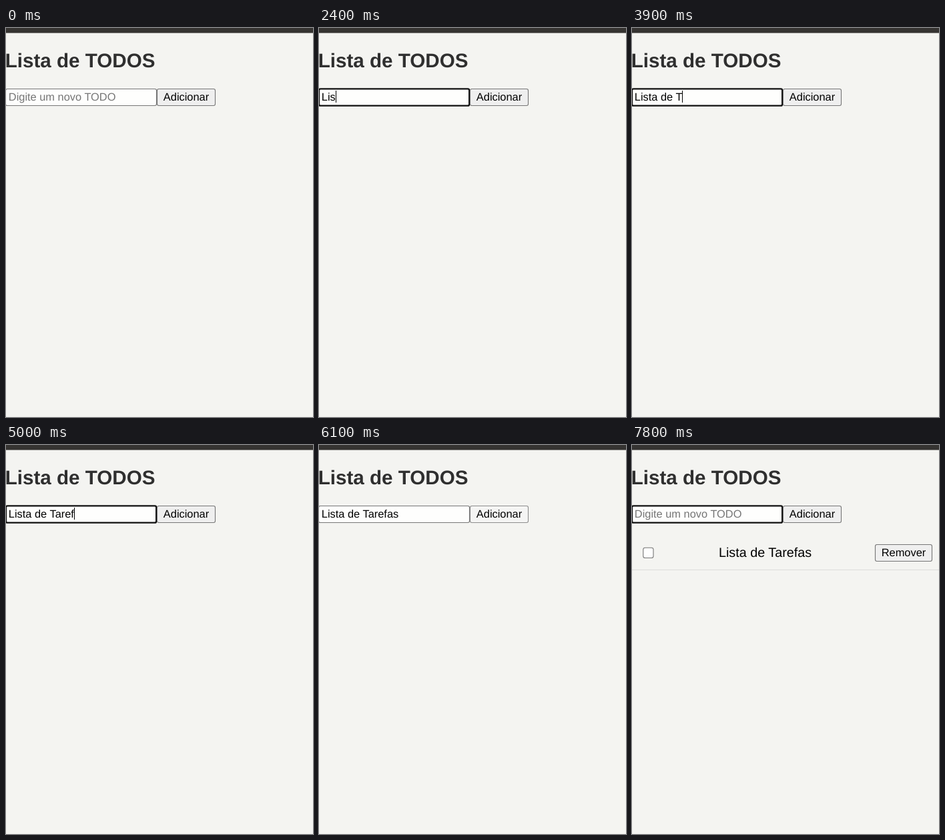
An HTML page that plays this animation: 460 by 584 pixels, repeating every 8000 ms.

```html
<!DOCTYPE html>
<html lang="pt">
<head>
<meta charset="utf-8">
<style>
html, body { margin: 0; width: 100%; height: 100%; overflow: hidden; background: #f4f4f1; }
svg { display: block; }
text { font: 16.4px "Liberation Sans", Arial, sans-serif; white-space: pre; text-rendering: geometricPrecision; }
.mid { text-anchor: middle; }
.box { stroke: #767676; stroke-width: 1.1; }
.button { fill: #efefef; }
</style>
</head>
<body>
<svg width="460" height="584" viewBox="0 0 460 584">
  <rect width="460" height="7.5" fill="#353331"/>
  <text x="-1.3" y="59" fill="#2f2f2f" style="font-size:29.6px;font-weight:bold">Lista de TODOS</text>

  <rect id="field" class="box" x="-.5" y="91.5" width="226" height="25" rx="2.5" fill="#fefefd"/>
  <rect id="ring" x="0" y="91.4" width="225.2" height="25.2" rx="2.2" fill="none" stroke="#101010" stroke-width="2.3"/>
  <text id="entry" x="3.8" y="109"></text>
  <rect id="caret" y="94" width="1" height="18"/>

  <rect id="add" class="box button" x="226.5" y="91.5" width="87" height="25" rx="2.5"/>
  <text class="mid" x="270" y="109">Adicionar</text>

  <g id="item">
    <rect class="box" x="16.8" y="154.3" width="15.2" height="15.2" rx="2.8" fill="#fefefe"/>
    <text x="130" y="168" style="font-size:19.75px">Lista de Tarefas</text>
    <rect class="box button" x="364.5" y="149.5" width="85" height="25" rx="2.5"/>
    <text class="mid" x="407" y="167">Remover</text>
    <rect y="187" width="460" height="1" fill="#dcdcda"/>
  </g>
</svg>
<script>
const LOOP = 8000, BLINK = 600;
const TASK = "Lista de Tarefas";
// moment each letter of TASK is typed
const KEYS = [1600, 2000, 2300, 2500, 2700, 2900, 3000, 3200, 3300,
              3900, 4400, 4600, 4700, 5000, 5100, 5300];
const FOCUS = 700, PRESS = 5900, ADDED = 6200, LEAVE = 6900, REFOCUS = 7100;

const el = id => document.getElementById(id);
const [field, ring, entry, caret, add, item] =
  ["field", "ring", "entry", "caret", "add", "item"].map(el);
const show = (node, on) => node.setAttribute("visibility", on ? "visible" : "hidden");
const within = (t, from, to) => t >= from && t < to;

function draw(t) {
  const typed = t < ADDED ? TASK.slice(0, KEYS.filter(k => k <= t).length) : "";
  entry.textContent = typed || "Digite um novo TODO";
  entry.style.fill = typed ? "#000" : "#757575";

  const focused = within(t, FOCUS, PRESS) || t >= REFOCUS;
  const lastInput = Math.max(...[FOCUS + 100, ...KEYS, REFOCUS + 100].filter(k => k <= t));
  show(ring, focused);
  show(caret, focused && t - lastInput < BLINK);
  const end = typed ? entry.getComputedTextLength() : 0;
  caret.setAttribute("x", Math.round(3.8 + end));

  const hovered = within(t, 400, PRESS) || t >= REFOCUS;
  field.style.stroke = hovered ? "#4f4f4f" : "#767676";
  const pressed = within(t, PRESS, ADDED);
  add.style.fill = pressed ? "#f5f5f4" : within(t, ADDED, LEAVE) ? "#e5e5e5" : "#efefef";
  add.style.stroke = pressed ? "#8d8d8d" : "#767676";
  show(item, t >= ADDED);
}

const start = performance.now();
function tick() {
  draw((performance.now() - start) % LOOP);
  requestAnimationFrame(tick);
}
tick();
</script>
</body>
</html>
```
